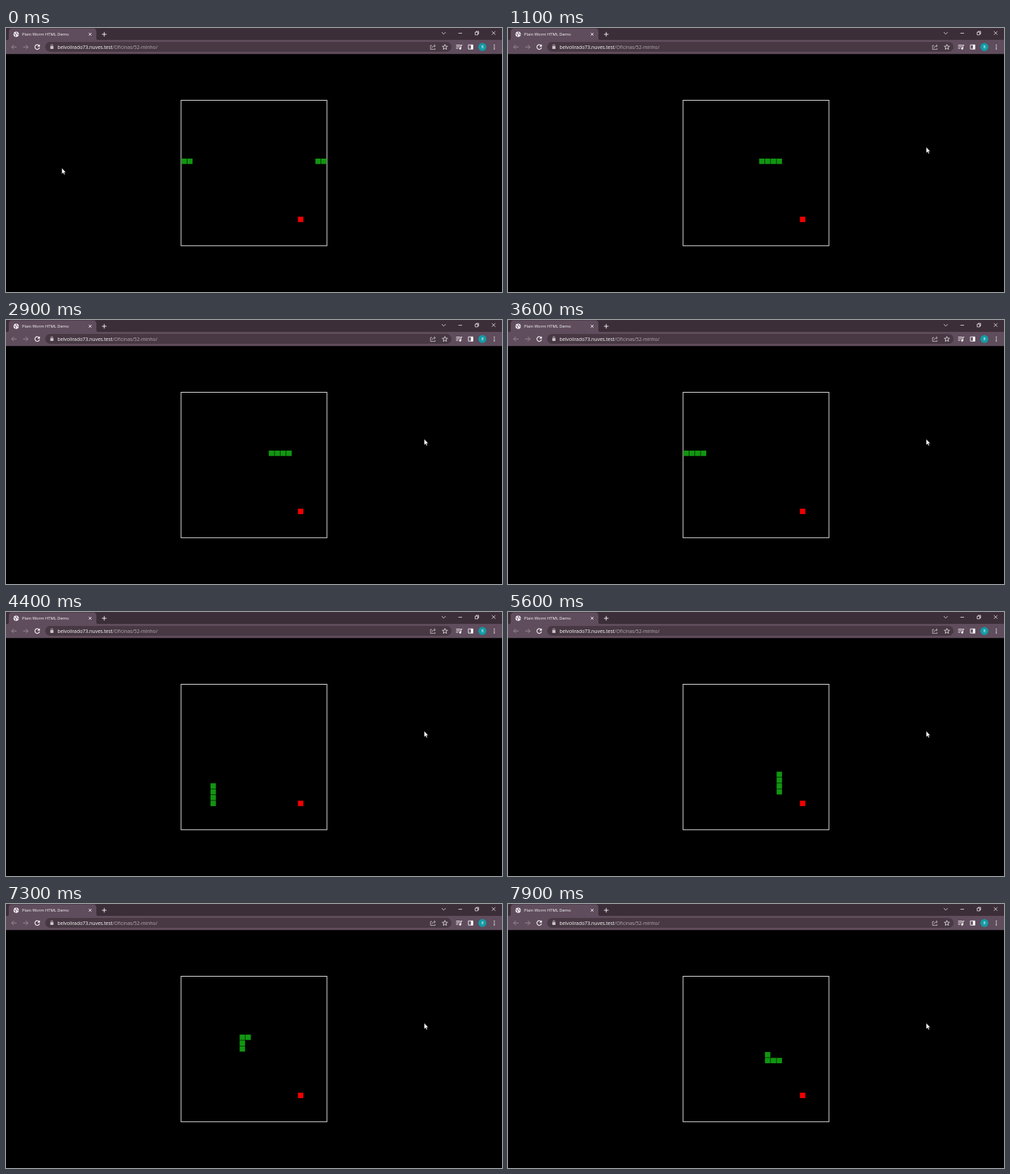
Animation of 708x378 px, one loop 8 s. Source, as an HTML page:

```html
<!DOCTYPE html>
<html lang="en">
<head>
<meta charset="utf-8">
<title>Worm</title>
<style>
  html, body { margin: 0; width: 100%; height: 100%; overflow: hidden; background: #000; }
  svg { display: block; width: 708px; height: 378px; }
  text { font-family: "Open Sans", "Noto Sans", sans-serif; fill: #fff; }
  .line { fill: none; stroke: #f1ecf0; stroke-width: 1; }
  .thin { stroke-width: .8; }
  .dim { stroke: #9c8c98; }
</style>
</head>
<body>
<svg viewBox="0 0 708 378">
  <!-- tab strip -->
  <rect width="708" height="18" fill="#3c2e38"/>
  <path d="M0 18Q4 18 4 14V5Q4 .5 8.500 .5H124.500Q129 .5 129 5V14Q129 18 133 18Z" fill="#5f4c5c"/>
  <circle cx="14.500" cy="9" r="3.800" fill="#f4f0f3"/>
  <path d="M11.500 8.200L14 9.500 13.500 11.800M15 5.800L14.500 7.500 16.500 8.500 17.500 10" class="line" style="stroke:#5f4c5c"/>
  <text x="23" y="11" font-size="5.840">Plain Worm HTML Demo</text>
  <path class="line" d="M118.200 7L122 10.800M122 7L118.200 10.800M137 9H143.400M140.200 5.800V12.200"/>
  <path class="line thin" d="M622 6L624.800 8.800 627.600 6M645.800 7.500H651M693.600 4.700L698.600 9.700M698.600 4.700L693.600 9.700"/>
  <path class="line thin" d="M669.700 6H673.500V9.800H669.700ZM671 6V4.800H674.700V8.500H673.500"/>

  <!-- toolbar -->
  <rect y="17" width="708" height="20.300" fill="#5f4c5c"/>
  <rect x="56" y="20" width="580" height="14" rx="7" fill="#473843"/>
  <path class="line dim" d="M15 27.200H8M11.200 24L8 27.200 11.200 30.400M24.500 27.200H31.500M28.300 24L31.500 27.200 28.300 30.400"/>
  <path class="line" style="stroke-width:1.200" d="M47.200 25.200A3.300 3.300 0 1 0 47.800 28"/>
  <path d="M48.300 23.300V26.800H44.800Z" fill="#fff"/>
  <rect x="63.300" y="26" width="4.400" height="3.900" rx=".5" fill="#cfc5cc"/>
  <path class="line thin" style="stroke:#cfc5cc" d="M64.200 26V25A1.300 1.300 0 0 1 66.800 25V26"/>
  <text x="73.500" y="29.600" font-size="6.900">belvolirado73.nuves.test<tspan fill="#b9adb6">/Oficinas/52-minho/</tspan></text>
  <path class="line thin" style="stroke:#d5cbd2" d="M608 25H606V30.600H612.500V29M608 28.600Q608.500 25.500 612.600 25.500M611 23.600L613 25.500 611 27.400"/>
  <path class="line thin" d="M626.500 23.400L627.500 26.100 630.300 26.200 628.100 28 628.900 30.700 626.500 29.100 624.100 30.700 624.900 28 622.700 26.200 625.500 26.100Z"/>
  <path class="line" d="M642.500 24.500H648.500M642.500 26.800H648.500M642.500 29.100H645.500M649.400 29.300V24.500H651.300"/>
  <circle cx="648.300" cy="29.500" r="1.400" fill="#fff"/>
  <path class="line" d="M660 24.200H666.500V30.200H660Z"/>
  <rect x="663.600" y="24" width="3.200" height="6.400" fill="#fff"/>
  <circle cx="680" cy="27.200" r="5.700" fill="#149ba5"/>
  <text x="680" y="29.100" font-size="5" text-anchor="middle">B</text>
  <g fill="#fff"><circle cx="697" cy="24.500" r=".8"/><circle cx="697" cy="27.200" r=".8"/><circle cx="697" cy="29.900" r=".8"/></g>

  <!-- board -->
  <rect class="line" x="249.900" y="103.500" width="208.200" height="208.300" style="stroke:#e4e4e4"/>
  <g id="cells"></g>
  <path id="cursor" d="M0 0V8.300L1.900 6.600 3.200 9.500 4.600 8.900 3.300 6.100H5.800Z" fill="#fff" stroke="#000" stroke-width=".4"/>
</svg>
<script>
const LOOP = 8000, GRID = 25, CELL = 8.32, LENGTH = 4;
const STEPS = { R: [1, 0], L: [-1, 0], U: [0, -1], D: [0, 1] };
const ROUTE = "R57 D11 R11 U7 L4 U4 R3 D4 L5 U4 R4 D4 R2";

// Every cell the head visits, wrapping at the board edges.
const path = [[23, 10]];
for (const leg of ROUTE.split(" ")) {
  const [dx, dy] = STEPS[leg[0]];
  for (let i = +leg.slice(1); i > 0; i--) {
    const [x, y] = path[path.length - 1];
    path.push([(x + dx + GRID) % GRID, (y + dy + GRID) % GRID]);
  }
}

const cellGroup = document.getElementById("cells");
const cursor = document.getElementById("cursor");

function addCell(color) {
  const cell = document.createElementNS(cellGroup.namespaceURI, "rect");
  cell.setAttribute("width", CELL - .6);
  cell.setAttribute("height", CELL - .6);
  cell.setAttribute("fill", color);
  cellGroup.append(cell);
  return cell;
}

function place(cell, [x, y]) {
  cell.setAttribute("x", 250.3 + x * CELL);
  cell.setAttribute("y", 103.8 + y * CELL);
}

place(addCell("#f00000"), [20, 20]);
const worm = Array.from({ length: LENGTH }, () => addCell("#119611"));

function draw(now) {
  const time = now % LOOP;
  // The screen refreshes ten times a second; the worm moves fifteen.
  const refresh = Math.max(0, Math.floor(time / 100) - 1);
  const tail = Math.floor(refresh * 1.5);
  worm.forEach((cell, i) => place(cell, path[tail + i]));

  const p = Math.min(1, refresh / 8);
  const eased = p * p * (3 - 2 * p);
  cursor.setAttribute("transform", `translate(${79.7 + 517.3 * eased} ${200.6 - 30 * eased})`);
}

const start = performance.now();
function tick() {
  draw(performance.now() - start);
  requestAnimationFrame(tick);
}
tick();
</script>
</body>
</html>
```
